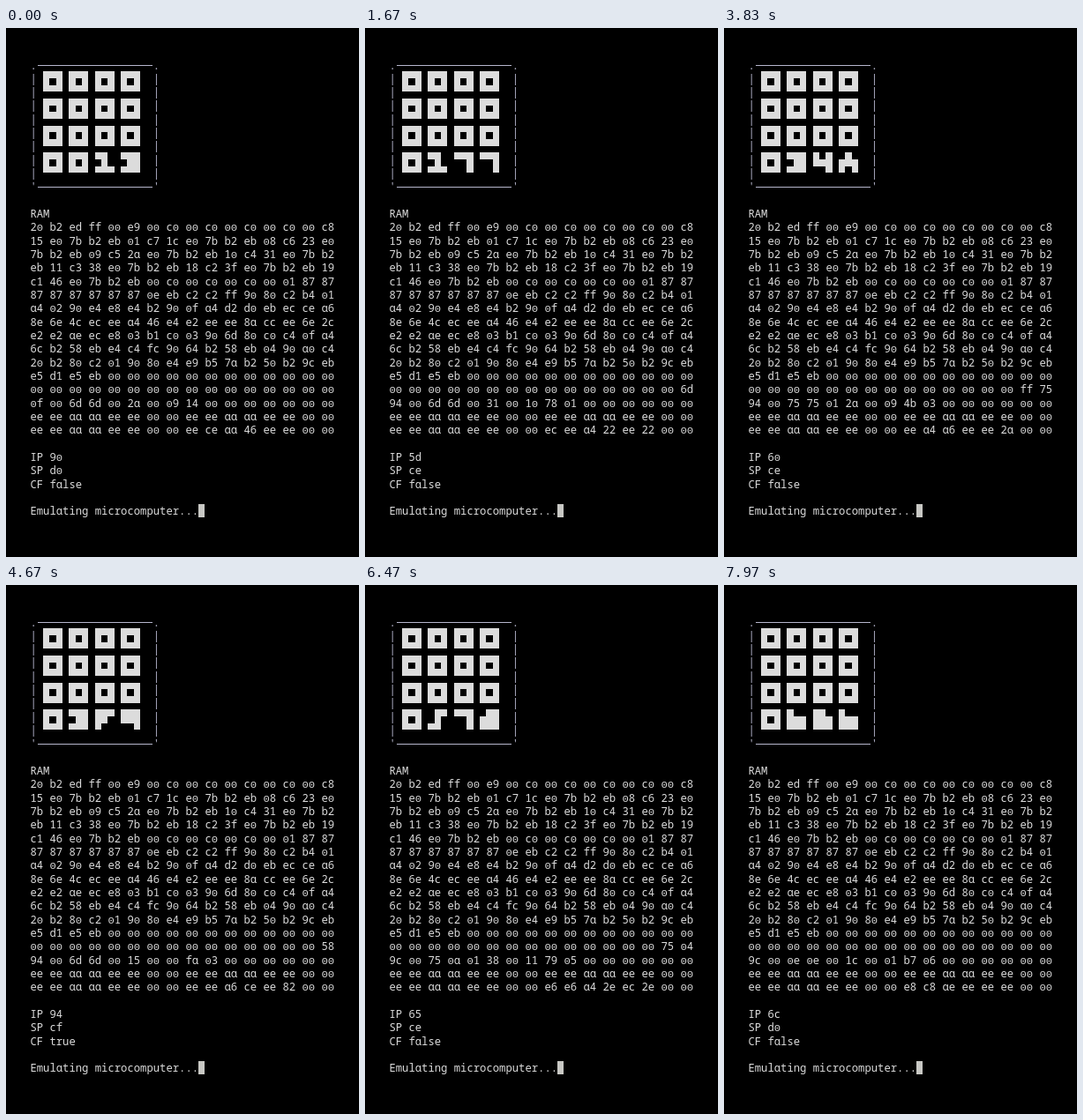
Recreate the animation shown at these times as an HTML page with a canvas. Size 400x600 px, loop 8000 ms.

```html
<!DOCTYPE html>
<html lang="en">
<head>
<meta charset="utf-8">
<title>Emulating microcomputer</title>
<style>
  html, body { margin: 0; width: 100%; height: 100%; overflow: hidden; background: #000; }
  canvas { display: block; }
</style>
</head>
<body>
<canvas width="400" height="600"></canvas>
<script>
const hex = n => n.toString(16).padStart(2, '0');

// Program: a 64-bit counter, printed as 16 hex digits on a 16x16 bit screen at e0.
const printByte = i => // screen offset, load counter byte, return address, call 85
  [hex((i >> 1) * 8 + (i & 1)), 'c' + (8 - i), hex(0x15 + 7 * i), 'e0 7b b2 eb'].join(' ');
const program = [
  '20 b2 ed ff 00 e9', '00 c0 '.repeat(4),
  ...Array.from({ length: 8 }, (_, i) => printByte(i)),
  '00 c0 '.repeat(3), '00 01', '87 '.repeat(8), '0e eb',
  // look up one row of a digit
  'c2 c2 ff 90 80 c2 b4 01 a4 02 90 e4 e8 e4 b2 90 0f a4 d2 d0 eb',
  // digit shapes: top, middle and bottom rows
  'ec ce a6 8e 6e 4c ec ee', 'a4 46 e4 e2 ee ee 8a cc', 'ee 6e 2c e2 e2 ae ec e8',
  // draw one byte as two digits
  '03 b1 c0 03 90 6d 80 c0 c4 0f a4 6c b2 58 eb',
  'e4 c4 fc 90 64 b2 58 eb 04 90 a0 c4 20 b2 80 c2 01 90 80 e4 e9',
  'b5 7a b2 50 b2 9c eb e5 d1 e5 eb',
].join(' ').trim().split(/\s+/).map(byte => parseInt(byte, 16));

const ram = new Uint8Array(256);
let ip, sp, carry, steps;

function reset() {
  ram.fill(0);
  ram.set(program);
  ip = sp = steps = 0;
  carry = false;
}

function push(value) {
  sp = (sp - 1) & 255;
  ram[sp] = value;
}

function pop() {
  const value = ram[sp];
  ram[sp] = 0;
  sp = (sp + 1) & 255;
  return value;
}

function binary(op) {
  const a = pop();
  const at = (sp + (1 << (op & 3)) - 1) & 255;
  const b = ram[at];
  let r;
  switch (op & 0xfc) {
    case 0x80: r = a + b; carry = r > 255; break;
    case 0x84: r = a + b + carry; carry = r > 255; break;
    case 0x90:
      if (a > 127) {
        r = b >> (256 - a);
        carry = (r << (256 - a)) !== b;
      } else {
        r = b << a;
        carry = r > 255;
      }
      break;
    case 0x9c: r = carry ? a : b; carry = false; break;
    case 0xa0: r = a | b; carry = r === 0; break;
    case 0xa4: r = a & b; carry = r === 0; break;
  }
  ram[at] = r;
}

function step() {
  const op = ram[ip];
  ip = (ip + 1) & 255;
  steps++;
  if (op < 0x80 || op >= 0xf0) return push(op);
  if (op < 0xb0) return binary(op);
  const low = op & 15;
  if (op >= 0xc0 && op < 0xd0) return push(ram[(sp + low) & 255]);
  if (op >= 0xd0 && op < 0xe0) {
    const value = pop();
    ram[(sp + low) & 255] = value;
    return;
  }
  switch (op) {
    case 0xb1: ram[sp]--; break;
    case 0xb2: ram[sp] = -ram[sp]; break;
    case 0xb4: ram[sp] = ~ram[sp]; carry = ram[sp] === 0; break;
    case 0xb5: carry = ram[sp] === 0; break;
    case 0xe4: { const a = pop(), b = pop(); push(a); push(b); break; }
    case 0xe5: pop(); break;
    case 0xe8: ram[sp] = ram[ram[sp]]; break;
    case 0xe9: { const value = pop(); ram[pop()] = value; break; }
    case 0xeb: ip = pop(); break;
    case 0xed: sp = pop(); break;
  }
}

// Emulation speed drifts slightly: [tick, instructions executed]
const pace = [[0, 43591], [50, 802144], [88, 1394712], [140, 2168543],
  [175, 2697530], [214, 3288854], [239, 3661986]];

function stepsAt(tick) {
  const i = Math.max(1, pace.findIndex(p => tick <= p[0]));
  const [t0, s0] = pace[i - 1], [t1, s1] = pace[i];
  return Math.round(s0 + (s1 - s0) * (tick - t0) / (t1 - t0));
}

const ctx = document.querySelector('canvas').getContext('2d');
const INK = '#dcdcdc', BORDER = '#b6b6cc', CURSOR = '#c8c8c4';
const FONT = '12.22px "Noto Sans Mono", "DejaVu Sans Mono", monospace';
const ZERO_FONT = '12.22px "Liberation Mono", monospace';
const CELL = 7.333, LINE = 15.333, LEFT = 27.4, MIDDLE = 42.3;
const colX = col => LEFT + col * CELL;
const lineY = line => MIDDLE + line * LINE;

// The zero is dotted and lower than the other numerals.
function zero(x, y) {
  ctx.save();
  ctx.font = ZERO_FONT;
  ctx.translate(x, y);
  ctx.scale(1, 0.85);
  ctx.fillText('0', 0, 0);
  ctx.restore();
}

function print(text, col, line) {
  const y = lineY(line) + 4.2;
  [...text].forEach((char, i) => {
    const x = colX(col + i);
    if (char === '0') zero(x, y);
    else if (char !== ' ') ctx.fillText(char === 'a' ? 'ɑ' : char, x, y);
  });
}

function block(x0, y0, x1, y1) {
  const x = Math.round(x0), y = Math.round(y0);
  ctx.fillRect(x, y, Math.round(x1) - x, Math.round(y1) - y);
}

function drawBorder() {
  ctx.fillStyle = BORDER;
  for (const [char, line, y] of [['.', 0, 42], ["'", 9, 180]]) {
    print(char, 0, line);
    print(char, 19, line);
    ctx.fillRect(36, y, 130, 1);
  }
  for (let line = 1; line <= 8; line++) {
    print('|', 0, line);
    print('|', 19, line);
  }
}

function drawScreen() {
  const top = 49.4, half = LINE / 2;
  for (let row = 0; row < 16; row++) {
    const bits = ram[0xe0 + row * 2] << 8 | ram[0xe1 + row * 2];
    for (let col = 0; col < 16; col++) {
      if (bits >> (15 - col) & 1) {
        block(colX(col + 2), top + row * half, colX(col + 3), top + (row + 1) * half);
      }
    }
  }
}

function draw() {
  ctx.fillStyle = '#000';
  ctx.fillRect(0, 0, 400, 600);
  ctx.font = FONT;
  drawBorder();
  ctx.fillStyle = INK;
  drawScreen();
  print('RAM', 0, 11);
  for (let row = 0; row < 16; row++) {
    print(Array.from(ram.subarray(row * 16, row * 16 + 16), hex).join(' '), 0, 12 + row);
  }
  // IP is shown after the fetch of the pending instruction.
  print('IP ' + hex((ip + 1) & 255), 0, 29);
  print('SP ' + hex(sp), 0, 30);
  print('CF ' + carry, 0, 31);
  print('Emulating microcomputer...', 0, 33);
  ctx.fillStyle = CURSOR;
  block(colX(26), 540, colX(27), 555);
}

let shown = -1;
function frame() {
  const time = performance.now() % 8000;
  const tick = Math.min(239, Math.floor((Math.floor(time / 10) * 10 + 5) * 0.03));
  if (tick !== shown) {
    const goal = stepsAt(tick);
    if (steps > goal) reset();
    while (steps < goal) step();
    draw();
    shown = tick;
  }
  requestAnimationFrame(frame);
}

reset();
frame();
</script>
</body>
</html>
```
